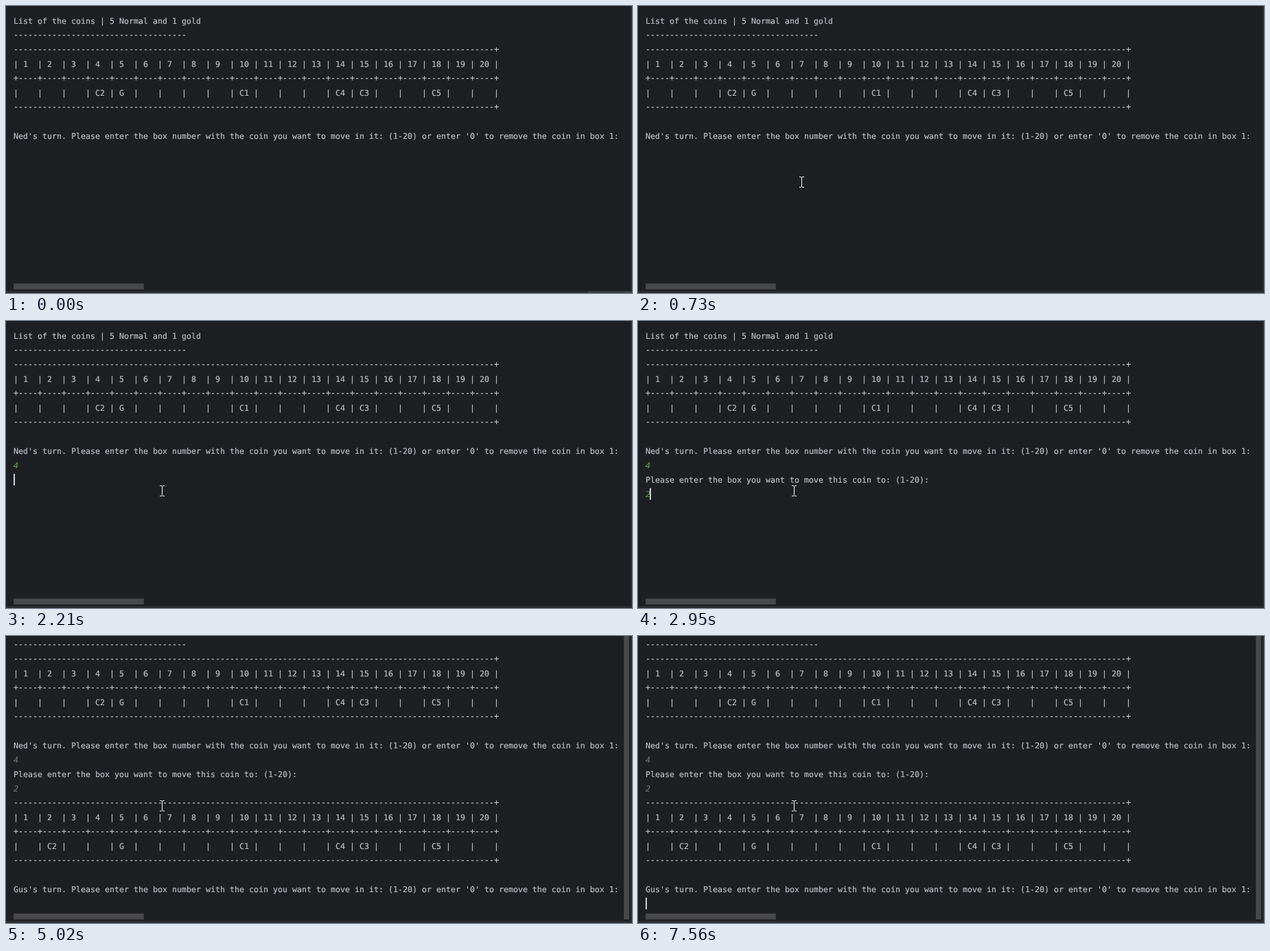
These frames come from a looping animation (912 px wide and 419 px high, 8000 ms). An HTML page:

```html
<!DOCTYPE html>
<html lang="en">
<head>
<meta charset="utf-8">
<title>Coin game console</title>
<style>
  html, body { margin: 0; width: 100%; height: 100%; overflow: hidden; background: #1e1f22; }
  body > * { position: absolute; }
  pre {
    left: 11px; top: 12px; margin: 0; color: #bcbec4;
    font: 11.64px/21px "DejaVu Sans Mono", "Noto Sans Mono", monospace;
    text-rendering: geometricPrecision; font-variant-ligatures: none;
    -webkit-text-stroke: .2px;
  }
  .rule { position: relative; top: -1px; }
  i { color: #629755; }
  .done i { color: #72756f; }
  #caret { width: 2px; height: 17px; background: #ced0d6; }
  .bar { box-sizing: border-box; background: #49494b; border: 1px solid #404143; }
  #hbar { left: 11px; top: 405px; width: 190px; height: 9px; }
  #vbar { left: 900px; top: 0; width: 8px; height: 414px; }
  .edge { background: #2b2d30; }
  #bottom { left: 0; top: 416px; width: 912px; height: 3px; }
  #right { left: 910px; top: 0; width: 2px; height: 419px; }
  #hover { left: 848px; top: 416px; width: 64px; height: 3px; background: #3c3f45; }
  #mouse { left: 0; top: 0; overflow: visible; }
</style>
</head>
<body>
<pre id="log"></pre>
<div id="caret"></div>
<div id="hbar" class="bar"></div>
<div id="vbar" class="bar"></div>
<div id="right" class="edge"></div>
<div id="bottom" class="edge"></div>
<div id="hover"></div>
<svg id="mouse" width="7" height="16">
  <path d="M0 .5H3M4 .5H7M3.5 1V15M0 15.5H3M4 15.5H7" fill="none" stroke="#fff"/>
</svg>
<script>
const LOOP = 8000, TICK = 1000 / 15, ROW = 21;
const $ = id => document.getElementById(id);
const show = (id, on) => $(id).style.visibility = on ? "visible" : "hidden";
const rule = text => `<span class="rule">${text}</span>`;

function board(coins) {
  const row = cell => Array.from({ length: 20 }, (_, i) => "| " + cell(i + 1).padEnd(3)).join("") + "|";
  const edge = rule("-".repeat(100) + "+");
  return [edge, row(String), rule("+----".repeat(20) + "+"), row(n => coins[n] || ""), edge, ""];
}
const ask = name => name + "'s turn. Please enter the box number with the coin you want to move in it: " +
  "(1-20) or enter '0' to remove the coin in box 1:";

const coins = { 5: "G", 10: "C1", 14: "C4", 15: "C3", 18: "C5" };
const start = ["List of the coins | 5 Normal and 1 gold", rule("-".repeat(36)),
  ...board({ ...coins, 4: "C2" }), ask("Ned")];
const first = [...start, "<i>4</i>"];
const second = [...first, "Please enter the box you want to move this coin to: (1-20):"];
const typed = [...second, "<i>2</i>"];
const final = [...typed, ...board({ ...coins, 2: "C2" }), ask("Gus")];

// start time, lines, caret row, caret column
const scenes = [
  [0, start, 9, 0],
  [1870, first, 9, 1],
  [2210, first, 10, 0],
  [2410, second, 11, 0],
  [2950, typed, 11, 1],
  [3280, final, 19, 0]
];
// the caret starts hidden and flips at each time
const blinks = [930, 1470, 1870, 4020, 4540, 5020, 5550, 6020, 6560, 7030, 7560];
// tick, x, y of the pointer's centre
const path = [[2, 866, 408], [11, 238, 257], [14, 207, 220], [19, 227, 248]];

function pointer(tick) {
  const i = path.findIndex(p => p[0] > tick);
  if (i < 0) return path[path.length - 1].slice(1);
  const [t0, x0, y0] = path[i - 1], [t1, x1, y1] = path[i];
  const u = Math.sin((tick - t0) / (t1 - t0) * Math.PI / 2);
  return [Math.round(x0 + (x1 - x0) * u), Math.round(y0 + (y1 - y0) * u)];
}

let current;
function draw(now) {
  const t = now % LOOP;
  const scene = scenes.filter(s => s[0] <= t).pop();
  const [, lines, row, col] = scene;
  const done = lines === final, shift = done ? -30 : 0;
  if (scene !== current) {
    current = scene;
    $("log").innerHTML = lines.join("\n");
    $("log").className = done ? "done" : "";
    $("log").style.top = 12 + shift + "px";
    $("caret").style.left = 11 + col * 6 + "px";
    $("caret").style.top = 13 + row * ROW + shift + "px";
    show("vbar", done);
  }
  show("caret", blinks.filter(b => b <= t).length % 2);

  const tick = Math.floor((t + 4) / TICK), inside = tick >= 2;
  show("hover", !inside);
  show("mouse", inside);
  if (inside) {
    const [x, y] = pointer(tick);
    $("mouse").style.transform = `translate(${x - 3}px, ${y - 8}px)`;
  }
}

const origin = performance.now();
function loop() {
  draw(performance.now() - origin);
  requestAnimationFrame(loop);
}
loop();
</script>
</body>
</html>
```
